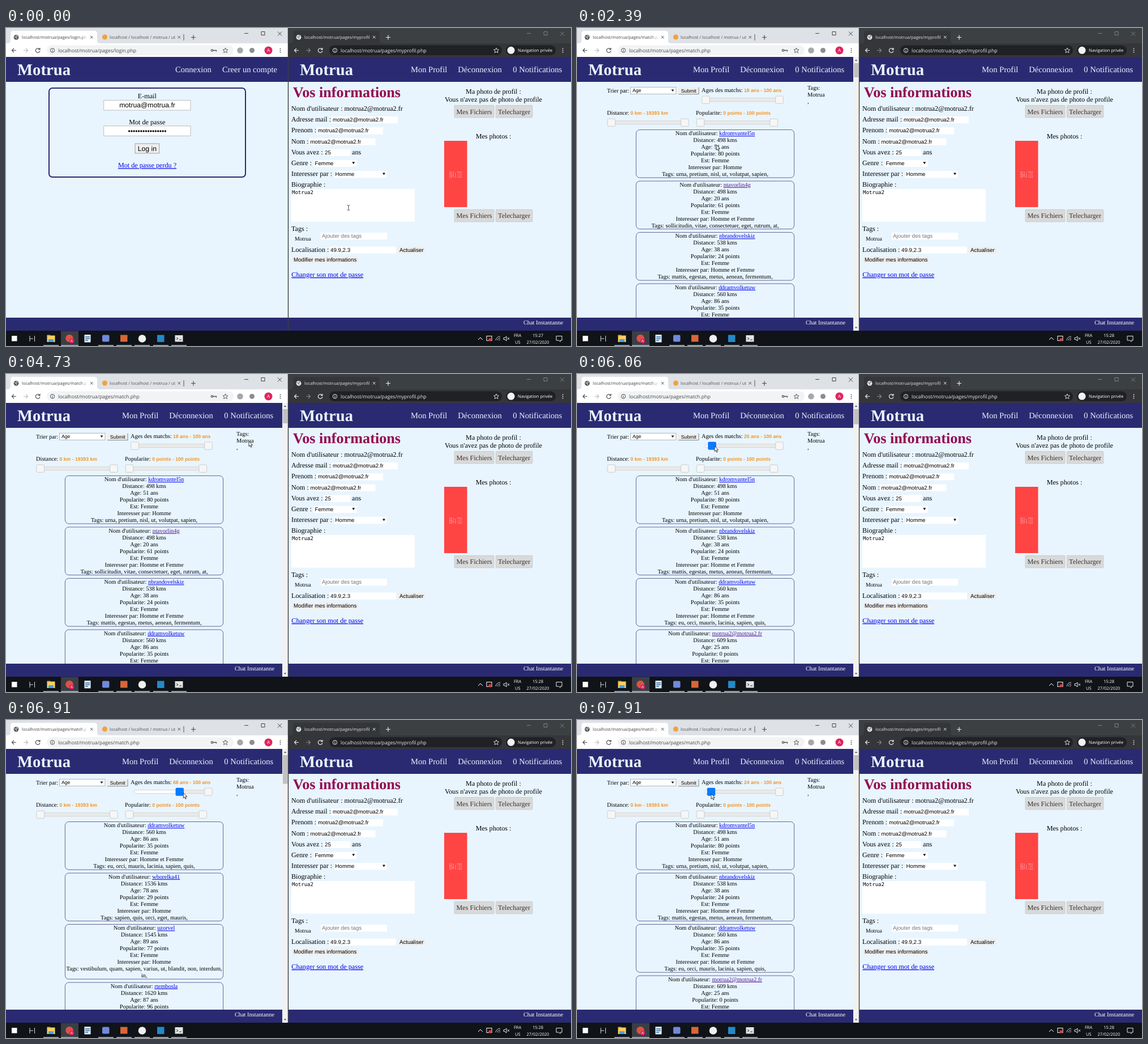
These frames come from a looping animation (998x561 px, 7990 ms). An HTML page:

```html
<!DOCTYPE html>
<html lang="fr">
<head>
<meta charset="utf-8">
<style>
html,body{margin:0;width:100%;height:100%;overflow:hidden;background:#e8f5fe}
svg{display:block}
text{white-space:pre;fill:#000;text-rendering:geometricPrecision}
.s{font-family:"Liberation Serif",serif}
.a{font-family:"Liberation Sans",sans-serif}
.u{font-family:"Open Sans",sans-serif}
.m{font-family:"DejaVu Sans Mono",monospace}
.link{fill:#00e;text-decoration:underline}
.seen{fill:#551a8b;text-decoration:underline}
</style>
</head>
<body>
<svg id="stage" width="100%" height="100%" viewBox="0 0 998 561" preserveAspectRatio="none"></svg>
<script>
const LOOP = 7990, NAVY = '#2a2a72', PAGE = '#e8f5fe', BASE = 10.4, FORM = 12.15, FIELD = 9.72;
const $ = id => document.getElementById(id);

// Drawing helpers
const text = (x, y, s, size, o = {}) =>
  `<text x="${x}" y="${y}" class="${o.font || 's'}" font-size="${size}" text-anchor="${o.anchor || 'start'}"` +
  ` font-weight="${o.weight || 400}" style="${o.fill ? 'fill:' + o.fill : ''}"${o.id ? ` id="${o.id}"` : ''}>${s}</text>`;
const rect = (x, y, w, h, fill, o = '') => `<rect x="${x}" y="${y}" width="${w}" height="${h}" fill="${fill}" ${o}/>`;
const disc = (x, y, r, fill) => `<circle cx="${x}" cy="${y}" r="${r}" fill="${fill}"/>`;
const line = (d, color, w = 1) => `<path d="${d}" fill="none" stroke="${color}" stroke-width="${w}"/>`;
const group = (id, body, o = '') => `<g id="${id}" ${o}>${body}</g>`;
const link = (s, seen) => `<tspan class="${seen ? 'seen' : 'link'}">${s}</tspan>`;
const mid = { anchor: 'middle' };

function globe(x, y, color, land) {
  return disc(x, y, 4.4, color) + line(`M${x - 3.2} ${y - 1}l3 1 1 2.4M${x} ${y - 3}l2.4 2`, land, 1.2);
}

function browser(x, dark) {
  const ink = dark ? '#e8eaed' : '#4a4d51', soft = dark ? '#85888c' : '#333';
  const bar = dark ? '#35363a' : '#fff';
  const pillEnd = dark ? 377 : 402;
  let s = rect(x, 0, 499, 28, dark ? '#3c4043' : '#dee1e6');
  s += `<path d="M${x + 3} 27q5 0 5-5V10q0-5 5-5h143q5 0 5 5v12q0 5 5 5z" fill="${bar}"/>`;
  s += rect(x, 27, 499, 24, bar);
  s += rect(x + 72, 30.5, pillEnd - 72, 17.5, dark ? '#202124' : '#f1f3f4', 'rx="8.7"');
  s += globe(x + 18, 16.3, dark ? '#e8eaed' : '#55595e', dark ? '#55595e' : '#e4e6e8');
  s += line(`M${x + 149} 14l4.5 4.5m0-4.5l-4.5 4.5`, ink, 1);
  const plus = dark ? 176 : 331;
  s += line(`M${x + plus - 4} 16.5h8m-4-4v8`, ink, 1.2);
  s += line(`M${x + 421} 9.5h7M${x + 451} 6.5h6v6h-6zM${x + 480} 6.5l7 7m0-7l-7 7`, soft, .9);
  s += line(`M${x + 18} 39.5h-7.5m3.5-3.5l-3.5 3.5 3.5 3.5`, ink, 1.2);
  s += line(`M${x + 31} 39.5h7.5m-3.5-3.5l3.5 3.5-3.5 3.5`, dark ? '#85888c' : '#b9bcc0', 1.2);
  s += line(`M${x + 59.3} 37.5a3.8 3.8 0 1 0 .6 2.8M${x + 60} 35v3h-3`, ink, 1.2);
  s += `<circle cx="${x + 82}" cy="39.5" r="3.7" fill="none" stroke="${ink}"/>` + line(`M${x + 82} 37.3v1M${x + 82} 39v2.8`, ink);
  const star = dark ? 367 : 387.5;
  s += line(`M${x + star} 35l1.3 3 3.2.3-2.4 2.1.8 3.2-2.9-1.7-2.9 1.7.8-3.2-2.4-2.1 3.2-.3z`, ink, .9);
  for (const dy of [-3.2, 0, 3.2]) s += disc(x + 484.5, 39.5 + dy, .9, ink);
  return s;
}

function siteHeader(x, w, items) {
  return rect(x, 51, w, 44, NAVY) + text(x + 20, 83, 'Motrua', 28.7, { weight: 700, fill: PAGE }) +
    items.map(([dx, s]) => text(x + dx, 78, s, 14.56, { fill: PAGE })).join('');
}
const memberNav = [[0, 'Mon Profil'], [83.3, 'Déconnexion'], [180.3, '0 Notifications']];
const navAt = dx => memberNav.map(([o, s]) => [dx + o, s]);

function loginPage() {
  const field = y => rect(172.7, y, 153.3, 17.5, '#fff', 'stroke="#b5b8bb" stroke-width=".9"');
  return siteHeader(0, 498, [[299, 'Connexion'], [382, 'Creer un compte']]) +
    rect(76, 106, 347, 157, PAGE, `rx="6" stroke="${NAVY}" stroke-width="2"`) +
    text(249.3, 124, 'E-mail', FORM, mid) + field(127.5) +
    text(249.5, 140.3, 'motrua@motrua.fr', FORM, { font: 'a', ...mid }) +
    text(249.3, 170, 'Mot de passe', FORM, mid) + field(172.8) +
    text(249.5, 186, '•'.repeat(16), FORM, { font: 'a', ...mid }) +
    rect(228, 204, 42.7, 17, '#efefef', 'id="logBtn" stroke="#8a8a8a" stroke-width=".8"') +
    text(249.4, 217, 'Log in', FORM, { font: 'a', ...mid }) +
    text(249.5, 246.3, link('Mot de passe perdu ?'), FORM, mid);
}

const knob = x => rect(x - 6.8, -6.6, 13.6, 13.2, '#f6f6f6', 'rx="1.5" stroke="#c5c5c5" stroke-width=".8"');
const track = (x, w) => rect(x, -3, w, 6, '#fff', 'rx="1.5" stroke="#c9c9c9" stroke-width=".7"');
const range = (x, w) => rect(x, -3, w, 6, '#e9e9e9', 'stroke="#d5d5d5" stroke-width=".7"');
function slider(x, y) {
  return `<g transform="translate(${x} ${y})">${track(-1, 132)}${range(0, 130)}${knob(0)}${knob(129.7)}</g>`;
}

function ageSlider(age, held) {
  const x = (age - 18) * 130 / 82;
  const low = held ? rect(x - 6.8, -6.6, 13.6, 13.2, '#007fff', 'rx="1.5" stroke="#003eff" stroke-width=".6"') : knob(x);
  return track(-1, 132) + range(x, 130 - x) + low + knob(130);
}

const orange = { font: 'a', weight: 700, fill: '#f6931f' };
function matchPage() {
  return group('cards', '') + siteHeader(0, 488, navAt(205)) +
    rect(0, 511, 488, 23, NAVY) + text(474, 522.7, 'Chat Instantanne', BASE, { anchor: 'end', fill: '#fff' }) +
    text(53, 113.5, 'Trier par:', BASE) +
    rect(94.5, 104.3, 80.5, 12, '#fff', 'stroke="#999" stroke-width=".7"') + text(98, 113.4, 'Age', 8.67, { font: 'a' }) +
    '<path d="M166.5 108.5h5l-2.5 3.8z" fill="#222"/>' +
    rect(179, 104.3, 36, 12.3, '#efefef') + line('M179 116.7h36v-12', '#777', .9) + text(197.3, 113.6, 'Submit', 8.67, { font: 'a', ...mid }) +
    text(220, 113.2, 'Ages des matchs:', BASE) + text(295, 113, '', 8.67, { ...orange, id: 'ageText' }) +
    text(53, 153.3, 'Distance:', BASE) + text(94.5, 153.2, '0 km - 19393 km', 8.67, orange) +
    text(210, 153.3, 'Popularite:', BASE) + text(258.3, 153.2, '0 points - 100 points', 8.67, orange) +
    group('ageSlider', '', 'transform="translate(227.5 126.7)"') + slider(60.7, 166.8) + slider(218, 166.8) +
    text(407, 109, 'Tags:', BASE) + text(407, 121, 'Motrua', BASE) + text(407, 133, ',', BASE) +
    rect(488, 51, 10, 483, '#f1f1f1') + '<path d="M490.7 58h4.6l-2.3-2.6zM490.7 527.5h4.6l-2.3 2.6z" fill="#555"/>' +
    rect(489, 62, 8.5, 25, '#c1c1c1', 'id="thumb"');
}

function profilePage() {
  const row = i => 145.9 + 19.2 * i;
  const label = (y, s) => text(504, y, s, FORM);
  const input = (x, y, w, s, fill) => rect(x, y - 9, w, 12.2, '#fff') + text(x + 2, y, s, FIELD, { font: 'a', fill });
  const caret = (x, y) => `<path d="M${x} ${y - 5.7}h5l-2.5 4z" fill="#111"/>`;
  const button = (x, w, y, s) => rect(x, y, w, 21.5, '#d9d9d9', 'rx="1" stroke="#c4c7ca" stroke-width=".8"') +
    text(x + w / 2, y + 15, s, FORM, { fill: '#333', ...mid });
  const files = y => button(792, 70, y, 'Mes Fichiers') + button(865.3, 64.5, y, 'Telecharger');
  const mail = 'motrua2@motrua2.fr';
  return rect(499, 51, 499, 483, PAGE) + siteHeader(499, 499, navAt(216)) +
    text(506.7, 122, 'Vos informations', 26.2, { weight: 700, fill: '#930a50' }) +
    label(row(0), "Nom d'utilisateur : " + mail) +
    label(row(1), 'Adresse mail :') + input(575, row(1), 117, mail) +
    label(row(2), 'Prenom :') + input(549, row(2), 117, mail) +
    label(row(3), 'Nom :') + input(535.5, row(3), 117, mail) +
    label(row(4), 'Vous avez :') + input(561, row(4), 47, '25') + text(611, row(4), 'ans', FORM) +
    label(row(5), 'Genre :') + input(543.5, row(5), 76, 'Femme') + caret(611.3, row(5)) +
    label(row(6), 'Interesser par :') + input(579.5, row(6), 93, 'Homme') + caret(665, row(6)) +
    label(row(7), 'Biographie :') + rect(504, 284, 218, 57.5, '#fff') + text(505, 293, 'Motrua2', 9, { font: 'm' }) +
    label(358, 'Tags :') + text(510, 375.3, 'Motrua', 9.75) + input(556, 370.2, 117, 'Ajouter des tags', '#757575') +
    label(395, 'Localisation :') + input(571, 394.6, 118, '49.9,2.3') +
    rect(692, 385.5, 49, 12, '#efefef') + text(695, 394.6, 'Actualiser', FIELD, { font: 'a' }) +
    rect(505, 403, 117, 12, '#efefef') + text(508, 412.3, 'Modifier mes informations', FIELD, { font: 'a' }) +
    text(504.3, 439, link('Changer son mot de passe'), FORM) +
    text(861, 116, 'Ma photo de profil :', FORM, mid) +
    text(861, 130, "Vous n'avez pas de photo de profile", FORM, mid) + files(136.5) +
    text(861, 195.3, 'Mes photos :', FORM, mid) + rect(774, 199, 40.5, 117, '#f44') +
    `<g transform="translate(794 263.5) scale(.32 1)">${text(0, 0, '864 x 720', 16, { font: 'a', fill: '#ffa0a0', ...mid })}</g>` +
    files(320.3) + rect(499, 511, 499, 23, NAVY) +
    text(984, 522.7, 'Chat Instantanne', BASE, { anchor: 'end', fill: '#fff' });
}

function taskbar() {
  const white = { font: 'u', fill: '#fff' };
  let s = rect(0, 534, 998, 27, '#101318') + rect(97, 534.5, 31, 27, '#3b3f45');
  for (const x of [66, 163, 195, 227, 260, 292]) s += rect(x, 559.3, 27, 1.7, '#76b9ed');
  s += rect(97, 559.3, 31, 1.7, '#76b9ed');
  s += rect(10, 543, 9.5, 9.5, '#fff');
  s += line('M42 543v10M50.5 543v10M42 548h6', '#ddd', 1);
  s += rect(72.5, 542.5, 14, 11.5, '#f7cf62') + rect(75, 549, 9, 5, '#4aa3df') + rect(72.5, 541.5, 6, 2, '#e5a82e');
  s += disc(112, 547.5, 6.8, '#dd5144') + disc(116, 552, 4, '#e91e63') + text(116, 554.3, 'A', 6, { ...white, ...mid });
  s += rect(138.5, 541, 11, 13.5, '#e8f1f8') + line('M140 545h8M140 548h8M140 551h5', '#2c6da8', 1.3);
  s += rect(170, 541.5, 12.5, 12, '#7289da', 'rx="2"') + rect(202, 541.5, 12.5, 12, '#d8663a') + disc(240.5, 548, 6.8, '#f0f0f0');
  s += rect(267, 541.5, 12.5, 12.5, '#2489ca') + rect(298.5, 542, 14, 11.5, '#e3e3e3') + line('M301 546l3 2-3 2M306 550h4', '#333');
  s += line('M834 550l4-4 4 4', '#fff') + rect(849, 543.5, 9, 8, 'none', 'stroke="#fff"') + disc(855, 550, 2.8, '#e03b3b');
  s += line('M865 551a8 8 0 0 1 8-7M868 551a5 5 0 0 1 5-4M870.7 551.5a2.5 2.5 0 0 1 2.3-2', '#ddd', .9);
  s += line('M879 546.5h2l3-2.5v8l-3-2.5h-2zM886 546.2l3 3.5m0-3.5l-3 3.5', '#fff', .9);
  s += text(897, 545, 'FRA', 7.5, white) + text(899, 556.5, 'US', 7.5, white);
  s += text(939.5, 545, '', 7.5, { ...white, ...mid, id: 'clock' }) + text(939.5, 556.5, '27/02/2020', 7.5, { ...white, ...mid });
  return s + line('M972 543.5h10v7.5h-3v2.5l-2.5-2.5h-4.5z', '#fff', .9);
}

const BOTH = 'Homme et Femme';
const members = [
  ['kdromvantel5n', 498, 51, 80, 'Homme', 'urna, pretium, nisl, ut, volutpat, sapien,'],
  ['ptavorlin4g', 498, 20, 61, BOTH, 'sollicitudin, vitae, consectetuer, eget, rutrum, at,', true],
  ['nbrandovelskiz', 538, 38, 24, BOTH, 'mattis, egestas, metus, aenean, fermentum,'],
  ['ddramvolketuw', 560, 86, 35, BOTH, 'eu, orci, mauris, lacinia, sapien, quis,'],
  ['motrua2@motrua2.fr', 609, 25, 0, 'Homme', 'Motrua,', true],
  ['jcalvorinea2', 995, 63, 1, BOTH, 'ut, nulla, sed, accumsan, felis, ut, at, dolor, quis, odio,'],
  ['wborelka41', 1536, 78, 29, 'Homme', 'sapien, quis, orci, eget, mauris,'],
  ['uzorvel', 1545, 89, 77, 'Homme', 'vestibulum, quam, sapien, varius, ut, blandit, non, interdum,|in,'],
  ['rtembosla', 1620, 87, 96, 'Homme', 'ut, tellus, nulla, ut, erat,'],
  ['kvarel2z', 1636, 91, 92, 'Homme', 'nulla, ut, erat,']
];

function cardList(minAge) {
  let top = 179.5, out = '';
  for (const [name, km, age, points, wants, tags, seen] of members) {
    if (age < minAge || top > 511) continue;
    const rows = [`Nom d'utilisateur: ${link(name, seen)}`, `Distance: ${km} kms`, `Age: ${age} ans`,
      `Popularite: ${points} points`, 'Est: Femme', `Interesser par: ${wants}`, ...('Tags: ' + tags).split('|')];
    const h = rows.length * 11.96 + .9;
    out += rect(104.4, top, 279.2, h, 'none', `rx="6.5" stroke="${NAVY}" stroke-width=".7"`);
    rows.forEach((row, i) => out += text(244, top + 9.8 + i * 11.96, row, BASE, mid));
    top += h + 5.9;
  }
  return out;
}

// Static scene
$('stage').innerHTML =
  `<defs><linearGradient id="fade"><stop stop-color="#fff" stop-opacity="0"/><stop offset="1" stop-color="#fff"/></linearGradient>
   <clipPath id="tab"><path d="M0 0h143.5v27H0zM527 0h115v27H527z"/></clipPath>
   <clipPath id="tab2"><path d="M180 0h119v27H180z"/></clipPath></defs>` +
  rect(0, 0, 998, 561, PAGE) + group('login', loginPage()) + group('match', matchPage()) +
  group('loginFoot', rect(0, 511, 498, 23, NAVY)) + browser(0, false) +
  `<g clip-path="url(#tab)">${text(28, 19, '', 7.5, { font: 'u', fill: '#444', id: 'tabTitle' })}</g>` + rect(132, 8, 12, 16, 'url(#fade)') +
  disc(174.5, 16, 4.5, '#f0a23c') +
  `<g clip-path="url(#tab2)">${text(183, 19, 'localhost / localhost / motrua / utilisateurs', 7.5, { font: 'u', fill: '#555' })}</g>` +
  line('M303.5 14l4.5 4.5m0-4.5l-4.5 4.5M314 11v11', '#555') +
  text(92, 42.6, '', 8.7, { font: 'u', fill: '#444', id: 'url' }) +
  '<circle cx="364" cy="39.5" r="1.7" fill="none" stroke="#555" stroke-width="1.3"/>' + line('M366 39.5h5.5v2', '#555', 1.4) +
  disc(413.5, 39.5, 5.3, '#a5a8ab') + disc(434.5, 39.5, 4.5, '#8b8e91') + disc(463.5, 39.5, 7, '#e0245e') +
  text(463.5, 42.4, 'A', 8, { font: 'u', fill: '#fff', ...mid }) +
  profilePage() + browser(499, true) +
  `<g clip-path="url(#tab)">${text(527, 19, 'localhost/motrua/pages/myprofil.php', 7.5, { font: 'u', fill: '#dfe1e5' })}</g>` +
  text(591, 42.6, 'localhost/motrua/pages/myprofil.php', 8.67, { font: 'u', fill: '#e8eaed' }) +
  rect(883, 30.5, 88, 17.5, '#202124', 'rx="8.7"') + disc(892, 39.3, 6.5, '#f1f3f4') +
  text(904, 42, 'Navigation privée', 7.5, { font: 'u', fill: '#fff' }) +
  rect(497.8, 0, 1.4, 534, '#3a3d42') + taskbar() +
  group('beam', line('M-2.3-4.5q2 0 2.3 1 .3-1 2.3-1M-2.3 4.5q2 0 2.3-1 .3 1 2.3 1M0-4v8', '#333', .9)) +
  group('arrow', '<path d="M0 0V9.3L2.1 7.3 3.6 10.8 5.1 10.2 3.7 6.8H6.6Z" fill="#fff" stroke="#111" stroke-width=".8"/>');

// Motion
const lerp = (a, b, p) => a + (b - a) * p;
const easeOut = p => 1 - (1 - p) ** 2;
const smooth = p => p * p * (3 - 2 * p);
// start, end, steps, target x, target y, bow, easing
const moves = [
  [690, 920, 4, 411, 233, 0, easeOut],
  [1150, 1610, 7, 246, 206, 0, smooth],
  [2620, 2620, 1, 248, 212, 0, easeOut],
  [2790, 3170, 6, 248, 207.5, 0, easeOut],
  [3570, 4190, 9, 432, 118, 0, smooth],
  [4420, 4730, 5, 429, 118.5, 0, easeOut],
  [5130, 5900, 11, 229, 127, 10, smooth]
];
// time, minimum age, pointer x, pointer y
const drag = [
  [5900, 18, 229, 127], [6610, 51, 292, 128], [6760, 62, 305, 128], [7100, 75, 323, 129], [7450, 83, 335, 130],
  [7530, 86, 334, 130], [7620, 76, 310, 130], [7700, 60, 285, 130], [7910, 24, 237, 130]
];

function pointer(t) {
  let x = 605, y = 317;
  for (const [start, end, n, tx, ty, bow, ease] of moves) {
    if (t < start) break;
    const gap = n > 1 ? (end - start) / (n - 1) : 1;
    const p = ease(Math.min(1, (Math.floor((t - start) / gap + .001) + 1) / n));
    x = lerp(x, tx, p);
    y = lerp(y, ty, p) - 4 * bow * p * (1 - p);
  }
  return [x, y];
}

function dragState(t) {
  const q = Math.min(7910, 5980 + Math.floor((t - 5960) / 78) * 78);
  const i = Math.max(1, drag.findIndex(k => k[0] >= q));
  const a = drag[i - 1], b = drag[i], p = (q - a[0]) / (b[0] - a[0]);
  return a.map((v, k) => lerp(v, b[k], p)).slice(1);
}

const show = (id, on) => $(id).setAttribute('display', on ? 'inline' : 'none');
let shownAge = '';

function setAge(age, held) {
  const key = age + '/' + held;
  if (key === shownAge) return;
  shownAge = key;
  $('ageText').textContent = `${age} ans - 100 ans`;
  $('ageSlider').innerHTML = ageSlider(age, held);
  $('cards').innerHTML = cardList(age);
  const share = age < 51 ? lerp(1, .714, (age - 18) / 33) : lerp(.714, .301, (age - 51) / 32);
  $('thumb').setAttribute('height', 25 / share);
}

function render(t) {
  const matched = t >= 2240, held = t >= 5980;
  show('login', !matched);
  show('loginFoot', !matched);
  show('match', matched);
  const path = `localhost/motrua/pages/${matched ? 'match' : 'login'}.php`;
  $('tabTitle').textContent = $('url').textContent = path;
  $('clock').textContent = t < 2390 ? '15:27' : '15:28';
  $('logBtn').setAttribute('fill', t >= 1530 ? '#e5e5e5' : '#efefef');

  let age = 18, [x, y] = pointer(t);
  if (held) [age, x, y] = dragState(t);
  setAge(Math.round(age), held);

  const beam = t < 690 || (t >= 2620 && t < 3640);
  show('beam', beam);
  show('arrow', !beam);
  $(beam ? 'beam' : 'arrow').setAttribute('transform', `translate(${x} ${y})`);
}

function tick() {
  render(performance.now() % LOOP);
  requestAnimationFrame(tick);
}
tick();
</script>
</body>
</html>
```
